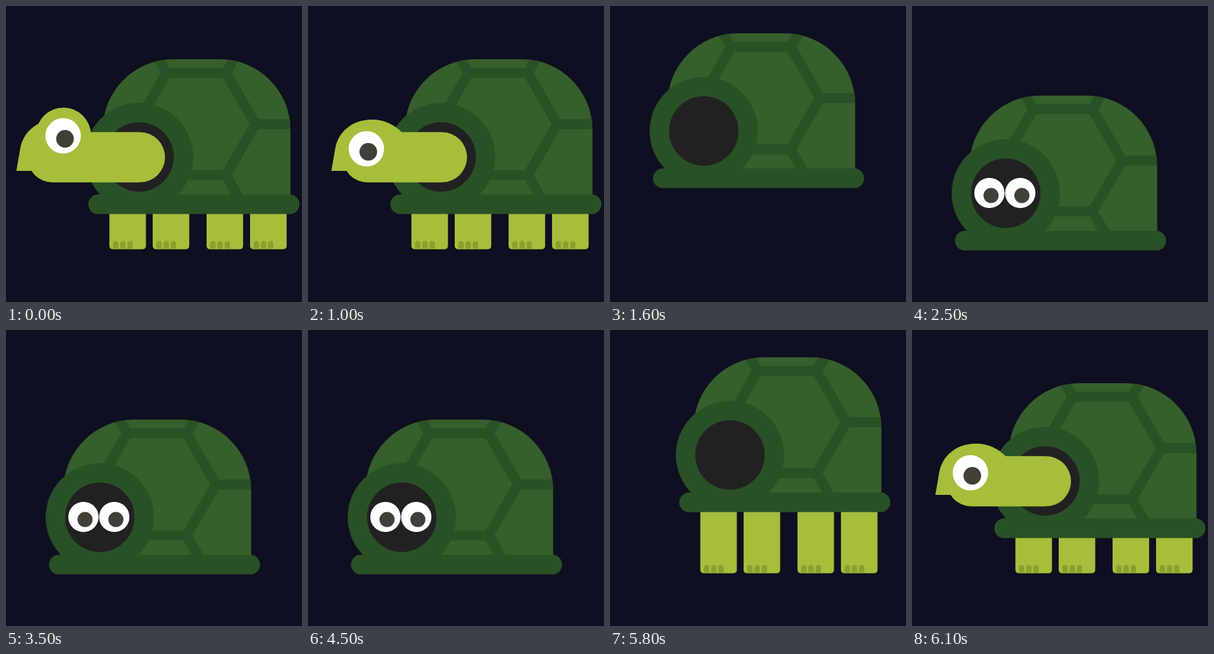
An HTML page without scripts that plays this animation: 456 px wide and 456 px high, repeating every 6.2 s.

```html
<!DOCTYPE html>
<html lang="en">
<head>
<meta charset="utf-8">
<title>Shy turtle</title>
<style>
  html, body { margin: 0; width: 100%; height: 100%; overflow: hidden; background: #0e0f20; }
  svg { display: block; width: 100vw; height: 100vh; }

  .skin { fill: #a6be3c; }
  .toe { fill: #8ca02f; }
  .plate { fill: #375f2d; }
  .rim { fill: #2a5126; }
  .seam { fill: none; stroke: #2a5126; stroke-width: 15.6; }
  .hole { fill: #212121; }
  .white { fill: #fff; }
  .pupil { fill: #443e39; }

  /* every pose is held until the next one */
  .shell, .legs, .head, .face, .peek { animation: 6.2s step-end infinite; }
  .shell { animation-name: shell; transform-origin: 287px 201px; }
  .legs { animation-name: legs; }
  .head { animation-name: head; }
  .face { animation-name: face; }
  .peek { animation-name: peek; }

  /* hop up, rock down to the ground, hop back */
  @keyframes shell {
    0%, 95.16%, 100% { transform: none; }
    20.96%, 93.54% { transform: translate(-20.2px, -40px); }
    22.58%, 91.93% { transform: translate(-40px, -80px); }
    24.19%, 90.32% { transform: translate(-60px, -60px); }
    25.8%, 88.7% { transform: translate(-60.6px, -40px); }
    27.41% { transform: translate(-60.6px, -16px) rotate(5deg); }
    29.03% { transform: translate(-60.6px, 8px); }
    30.64% { transform: translate(-60.6px, 32px) rotate(-5deg); }
    32.25% { transform: translate(-60.6px, 56px); }
  }

  @keyframes legs {
    0%, 95.16%, 100% { transform: none; opacity: 1; }
    20.96%, 93.54% { transform: translate(-20.2px, 0); opacity: 1; }
    22.58%, 91.93% { transform: translate(-40px, -80px); opacity: 1; }
    24.19%, 90.32% { transform: translate(-60px, -89px); opacity: 1; }
    25.8%, 88.7% { transform: translate(-60.6px, -100px); opacity: 0; }
  }

  @keyframes head {
    0%, 100% { transform: none; opacity: 1; }
    16.12%, 98.38% { transform: translate(20px, 0); opacity: 1; }
    17.74%, 96.77% { transform: translate(60px, 0); opacity: 1; }
    19.35%, 95.16% { transform: translate(120px, 0); opacity: 1; }
    20.96%, 93.54% { transform: translate(180px, 0); opacity: 0; }
  }

  @keyframes face {
    0%, 100% { transform: none; opacity: 1; }
    16.12%, 96.77% { transform: translate(-18px, 20px); opacity: 1; }
    19.35%, 95.16% { transform: translate(-18px, 20px); opacity: 0; }
  }

  @keyframes peek {
    0%, 48.38%, 64.51%, 80.64%, 100% { opacity: 0; }
    40.32%, 56.45%, 72.58% { opacity: 1; }
  }
</style>
</head>
<body>
<svg viewBox="0 0 456 456">
  <defs>
    <path id="dome" d="M149 300V191A109 109 0 0 1 258 82H329.3A109 109 0 0 1 438.3 191V300Z"/>
    <clipPath id="domeClip"><use href="#dome"/></clipPath>
    <clipPath id="neckClip">
      <path d="M0 0H206.2V194.2A38.8 38.8 0 0 1 206.2 271.8V456H0Z"/>
    </clipPath>
    <path id="toe" class="toe" d="M0 374.6V366a4.1 4.1 0 0 1 8.2 0V374.6Z"/>
    <g id="leg">
      <rect class="skin" y="255" width="56.3" height="119.8" rx="5"/>
      <use href="#toe" x="5.6"/>
      <use href="#toe" x="16.7"/>
      <use href="#toe" x="27.8"/>
    </g>
    <g id="eye">
      <circle class="white" r="27.3"/>
      <circle class="pupil" cx="2.9" cy="4.6" r="13.6"/>
    </g>
  </defs>

  <rect width="456" height="456" fill="#0e0f20"/>

  <g class="legs">
    <use href="#leg" x="159.3"/>
    <use href="#leg" x="226"/>
    <use href="#leg" x="309"/>
    <use href="#leg" x="376"/>
  </g>

  <g class="shell">
    <use href="#dome" class="plate"/>
    <g clip-path="url(#domeClip)">
      <path class="seam" d="M384.3 182L338.7 103H247.3L201.7 182L247.3 260.5H338.7Z
        M338.7 103l17.3 -30M247.3 103l-17.3 -30M384.3 182H445M338.7 260.5l23 40"/>
    </g>
    <circle class="rim" cx="205" cy="232.5" r="83.4"/>
    <rect class="rim" x="126.8" y="290.2" width="325.2" height="30.4" rx="15.2"/>
    <circle class="hole" cx="205" cy="232.5" r="53.5"/>
  </g>

  <g clip-path="url(#neckClip)">
    <g class="head">
      <rect class="skin" x="33" y="194.2" width="260" height="77.6" rx="38.8"/>
      <path class="skin" d="M16 254L22 219C26 196 46 175 79 175C98 175 113 183 125 195V254Z"/>
      <g class="face">
        <circle class="skin" cx="88.5" cy="199" r="42.5"/>
        <use href="#eye" x="88" y="200"/>
      </g>
    </g>
  </g>

  <g class="peek">
    <use href="#eye" transform="translate(119.3 288) scale(.855)"/>
    <use href="#eye" transform="translate(166.8 288) scale(.855)"/>
  </g>
</svg>
</body>
</html>
```
